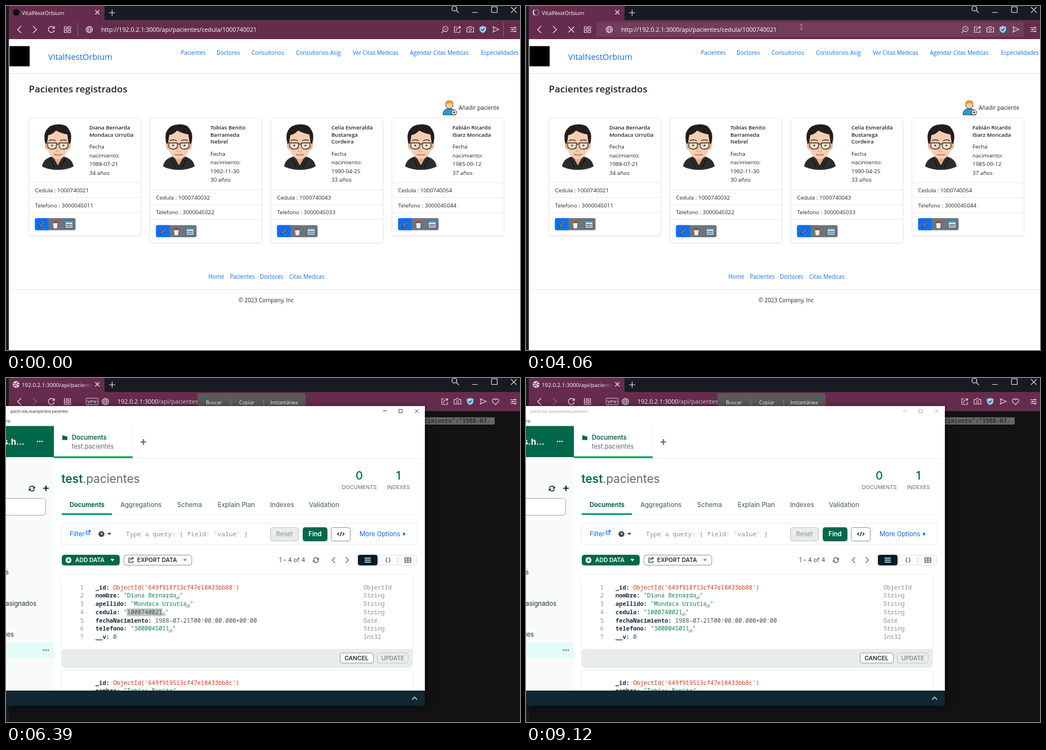
Animation of 913 by 613 pixels, one loop 9.25 s. Source, as an HTML page:

```html
<!DOCTYPE html>
<html lang="es">
<head>
<meta charset="utf-8">
<title>Pacientes</title>
<style>
html, body { margin: 0; width: 100%; height: 100%; overflow: hidden; background: #181c22; }
svg { display: block; width: 100%; height: 100%; }
text { white-space: pre; }
.ui { font-family: "Open Sans", "Noto Sans", sans-serif; }
.db { font-family: Inter, sans-serif; filter: drop-shadow(0 2px 7px rgba(0,0,0,.55)); }
.code { font-family: "Noto Sans Mono", monospace; }
.raw { font-family: "DejaVu Sans Mono", monospace; }
</style>
</head>
<body>
<svg id="stage" class="ui" viewBox="0 0 913 613" preserveAspectRatio="none"></svg>
<script>
const T = (x, y, s, t, f = '#212529', a = '') => `<text x="${x}" y="${y}" font-size="${s}" fill="${f}" ${a}>${t}</text>`;
const R = (x, y, w, h, f, a = '') => `<rect x="${x}" y="${y}" width="${w}" height="${h}" fill="${f}" ${a}/>`;
const P = (d, c = '#eadfe6', w = 1.1, f = 'none') => `<path d="${d}" fill="${f}" stroke="${c}" stroke-width="${w}"/>`;
const F = (d, c) => `<path d="${d}" fill="${c}"/>`;
const C = (x, y, r, f, a = '') => `<circle cx="${x}" cy="${y}" r="${r}" fill="${f}" ${a}/>`;
const G = (id, s, a = '') => `<g id="${id}" ${a}>${s}</g>`;
const move = (x, y, s) => `<g transform="translate(${x} ${y})">${s}</g>`;
const END = 'text-anchor="end"', MID = 'text-anchor="middle"';
const bold = 'font-weight="600"';

const PLUM = '#662c4e', BLUE = '#0d6efd', GREEN = '#00684a', SLATE = '#5c6c75', PALE = '#e8edeb', INK = '#1c2d38';
const HOST = '192.0.2.1:3000', ROUTE = '/api/pacientes';
const patients = [
  { name: ['Diana Bernarda', 'Mondaca Urrutia'], born: '1988-07-21', age: 34, id: '1000740021', tel: '3000045011' },
  { name: ['Tobías Benito', 'Barrameda', 'Nebrel'], born: '1992-11-30', age: 30, id: '1000740032', tel: '3000045022' },
  { name: ['Celia Esmeralda', 'Bustarega', 'Cordeira'], born: '1990-04-25', age: 33, id: '1000740043', tel: '3000045033' },
  { name: ['Fabián Ricardo', 'Ibarz Moncada'], born: '1985-09-12', age: 37, id: '1000740054', tel: '3000045044' }
];
const first = patients[0], docId = '649f918f13cf47e18433bb88';

/* ---- browser frame ---- */
const globe = x => C(x, 42, 5.8, 'none', 'stroke="#eadfe6"') +
  P(`M${x - 5.8} 42h11.6M${x - 5} 39h10M${x - 5} 45h10`, '#eadfe6', .9) +
  `<ellipse cx="${x}" cy="42" rx="2.7" ry="5.8" fill="none" stroke="#eadfe6"/>`;
const tools = P('M801 37h-4.5v10h10v-4M799.5 44.5c0-4 3-6 7.5-6.5M804 36l3.5 1.8-2 3.2') +
  P('M818.5 38.5h3l1-1.8h4l1 1.8h3v8h-12z') + C(824.5, 42.3, 2.2, 'none', 'stroke="#eadfe6"') +
  F('M847 35.5l5.8 2v4.5q-.6 4-5.8 6.3q-5.2-2.3-5.8-6.3v-4.5z', '#8ad3f5') +
  P('M844.3 41.6l2 2.2 3.6-4', PLUM, 1.5) +
  P('M865 37l10.5 4.7-10.5 4.7 1.6-4.7z');
const frame = R(0, 0, 913, 613, '#181c22') + R(5, 0, 170, 26, PLUM) + R(5, 25, 908, 34, PLUM) +
  P('M158.5 7.5l7.5 7.5m0-7.5l-7.5 7.5', '#f3eaf0', 1.2) + P('M183 12h11M188.5 6.5v11', '#e6e6e8', 1.2) +
  C(796.5, 4.5, 4.3, 'none', 'stroke="#e6e6e8" stroke-width="1.3"') + P('M799.6 7.6l4.6 4.6', '#e6e6e8', 1.3) +
  P('M828 11.5h10M862.5 1.5h10v10h-10zM897 2l10 10m0-10l-10 10', '#e6e6e8', 1.1) +
  P('M27 36l-6.5 6 6.5 6', '#f3eaf0', 1.2) +
  P('M103.5 37h4.5v4h-4.5zM110.3 37h4.5v4h-4.5zM103.5 43.3h4.5v4h-4.5zM110.3 43.3h4.5v4h-4.5z') +
  P('M896 38.5h11M896 42h11M896 45.5h11') + F('M903 37h1.5v3h-1.5zM899 40.5h1.5v3h-1.5zM903 44h1.5v3h-1.5z', '#eadfe6');
const status =
  G('loading', P('M75.5 37l10 10m0-10l-10 10', '#f3eaf0', 1.2) +
    C(18, 11.5, 5.2, 'none', 'stroke="#89607a" stroke-width="1.8"') + G('spin', P('M18 6.3A5.2 5.2 0 0 0 13.5 14', '#e8dde4', 1.8))) +
  G('reload', P('M85 38.6A5.4 5.4 0 1 0 85.9 43M86 36v3.6h-3.8', '#f3eaf0', 1.2)) +
  G('homeIcon', C(18, 11.5, 6, '#111')) +
  G('rawIcon', C(18, 11.5, 6, '#f2eaef') + P('M13 9q3 3 5 1t4-3M13.5 14q4-2 6 2M19 12h5', PLUM, 1.6));

/* ---- patients page ---- */
const avatar =
  F('M0 76Q2 62 18 58L38 58Q54 62 56 76Q44 82 28 82Q12 82 0 76Z', '#2c2b2d') +
  F('M19 52h18v9l-9 14-9-14z', '#e3a988') + P('M19 59l9 17 9-17M14 61l8 17M42 61l-8 17', '#111', 1.3) +
  F('M6 33q-3 10 4 14l2-14zM50 33q3 10-4 14l-2-14z', '#e9b393') +
  F('M8 20Q28 4 48 20L46 46Q40 63 28 63Q16 63 10 46Z', '#f6cdb0') +
  F('M6 36Q2 20 7 12Q14 0 30 1Q44 0 49 12Q54 20 50 36L47 34L45 19Q34 17 25 12Q18 19 11 20L9 34Z', '#231d1c') +
  P('M12 30q5-3 12 0M32 30q7-3 12 0', '#3a2a22', 1.5) +
  P('M10 34h15.5v6q-1 5-7.5 5t-8-5zM30.5 34h15.5v6q-1 5-8 5t-7.5-5zM25.5 36h5', '#2b2a30', 1.3, '#ffffff55') +
  C(18, 38.5, 1.8, '#3d5f6e') + C(38, 38.5, 1.8, '#3d5f6e') +
  P('M27 41l-2 8q3 2 6 0', '#d99c7c', 1) + P('M21 54.5q7 2 14 0', '#b5624f', 1.5);

function card(p, i) {
  const d = p.name.length > 2 ? 12.5 : 0, line = y => R(.5, y + d, 199, 1, '#e9eaec');
  const put = (x, y, t) => T(x, y + d, 9.85, t);
  return move(40 + 215 * i, 0,
    R(.5, 199.5, 199, 210 + d, '#fff', 'rx="4" stroke="#e6e7e9" filter="url(#soft)"') + move(24, 210, avatar) +
    p.name.map((n, k) => T(108, 220.3 + 12.4 * k, 9.6, n, '#212529', bold)).join('') +
    ['Fecha', 'nacimiento:', p.born, p.age + ' años'].map((s, k) => put(108, 254 + 15.5 * k, s)).join('') +
    line(314.5) + line(341) + line(367.5) + put(11.5, 332.2, 'Cedula : ' + p.id) + put(11.5, 358.8, 'Telefono : ' + p.tel) +
    move(0, d, R(11.5, 378, 72, 21.5, '#6c757d', 'rx="3"') + F('M14.5 378h21v21.5h-21q-3 0-3-3v-15.5q0-3 3-3z', BLUE) +
      P('M19 394l2.5-2.5 6.5-6.5', '#3b2b20', 3.4) + P('M20 393l2-2 6-6', '#c98643', 2) +
      F('M43.5 387h8l-1 9h-6z', '#f1eeee') + F('M43 384.5q4.5-3.5 9 0v2h-9z', '#a8452f') +
      R(65.5, 383, 13, 12.5, '#d8ecf4', 'stroke="#3a5468" stroke-width=".8"') + R(65.5, 383, 13, 3, '#4b9cc9') +
      P('M67 389.5h10M67 392.5h10', '#557', 1.5)));
}

const nav = [[310.5, 'Pacientes'], [374, 'Doctores'], [436, 'Consultorios'], [515, 'Consultorios Asig'], [616, 'Ver Citas Medicas'], [717.5, 'Agendar Citas Medicas'], [843.5, 'Especialidades']];
const foot = [[359.5, 'Home'], [397.7, 'Pacientes'], [451, 'Doctores'], [503, 'Citas Medicas']];
const links = (list, y) => list.map(([x, t]) => T(x, y, 9.9, t, BLUE)).join('');
const home = T(28, 15.5, 9.75, 'VitalNestOrbium', '#fff') + P('M48 36l6.5 6-6.5 6', '#f3eaf0', 1.2) +
  G('idle', R(127, 29, 1, 26, '#8d6079') + R(883, 29, 1, 26, '#8d6079')) +
  G('barHover', R(125, 28, 759, 27, '#733c5c', 'rx="3"')) +
  G('focus', R(125, 28.5, 760.5, 26, '#5f2948', 'rx="3" stroke="#b8608f" stroke-width="1.3"') + R(446, 35, 1, 13, '#fff')) +
  globe(148) + T(169, 45.5, 10.7, 'http://' + HOST + ROUTE + '/cedula/' + first.id, '#fff') +
  C(780.5, 41, 4.6, 'none', 'stroke="#eadfe6" stroke-width="1.1"') + P('M777.2 44.3l-3.7 3.7M778.5 41h4') + tools +
  R(5, 59, 908, 554, '#fff') + R(6, 71.5, 36, 36, '#000') +
  T(75, 95.5, 14.7, 'VitalNestOrbium', BLUE) + links(nav, 86.7) + R(5, 120, 908, 1, '#dee2e6') +
  T(40.5, 154, 17, 'Pacientes registrados', '#212529', bold) +
  F('M776 194q0-11 11.5-11t11.5 11z', '#2f9ad6') + P('M776 194q0-11 11.5-11t11.5 11z', '#233', .9) +
  C(787.5, 176.5, 6.5, '#f8cfa4', 'stroke="#433" stroke-width=".9"') + F('M780.5 176q-1-8 7-8t7 8q-3-3-6-3t-8 3z', '#e8932f') +
  C(796, 189.5, 4.5, '#fff', 'stroke="#222"') + P('M793.5 189.5h5M796 187v5', '#222') +
  T(804, 184.8, 9.9, 'Añadir paciente') + patients.map(card).join('') +
  links(foot, 485.5) + R(5, 504.5, 908, 1, '#dee2e6') + T(413, 527.6, 9.9, '© 2023 Company, Inc');

/* ---- raw reply page ---- */
const reply = [
  `{"id":"${docId}","nombre":"${first.name[0]}","apellido":"${first.name[1]}","cedula":"${first.id}","fechaNacimiento":"1988-07-`,
  `21","telefono":"${first.tel}","edad":34}`];
const raw = T(28, 15.5, 9.8, HOST + ROUTE.slice(0, -1), '#fff') + R(134, 2, 22, 20, 'url(#fade)') +
  P('M48 36l6.5 6-6.5 6', '#94708a', 1.1) +
  R(142.5, 36, 21, 11.5, 'none', 'rx="1.5" stroke="#d9c9d3"') + T(153, 44.8, 7.6, 'VPN', '#eadfe6', MID + ' letter-spacing=".5" ' + bold) +
  globe(176.5) + T(198, 45.5, 10.68, `${HOST}<tspan fill="#dccbd6">${ROUTE}/cedula/${first.id}</tspan>`, '#fff') +
  move(-22.5, 0, tools) + P('M869.5 47.5l-4.8-4.8q-2-3 .4-5 2.8-1.5 4.4 1.3 1.6-2.8 4.4-1.3 2.4 2 .4 5z') +
  R(5, 59, 908, 554, '#121212') +
  G('selection', R(12, 70, 0, 13, 'inherit', 'id="row1"') + R(12, 83, 0, 13, 'inherit', 'id="row2"')) +
  G('reply', reply.map((s, i) => T(12, 80.3 + 13 * i, 10.29, s, 'inherit')).join(''), 'class="raw"') +
  G('popup', R(340, 27, 192, 31, '#5a5a5a', 'rx="4"') + F('M430 58h12l-6 8z', '#5a5a5a') +
    T(355, 46.6, 8.95, 'Buscar', '#fff') + T(414, 46.6, 8.95, 'Copiar', '#fff') + T(469, 46.6, 8.95, 'Instantánea', '#fff') +
    R(398.5, 37, 1, 14, '#8b8b8b') + R(457.5, 37, 1, 14, '#8b8b8b'));

/* ---- database window ---- */
const dots = (x, y, f) => [-4, 0, 4].map(d => C(x + d, y, 1.3, f)).join('');
const down = (x, y, f) => F(`M${x - 3.5} ${y - 2}h7l-3.5 4.2z`, f);
const cycle = (x, y, c) => P(`M${x - 4.3} ${y - 1}a4.4 4.4 0 0 1 8-1.3M${x + 4.3} ${y + 1}a4.4 4.4 0 0 1-8 1.3`, c, 1.5) +
  F(`M${x + 5.5} ${y - 4.5}v4.5h-4.5zM${x - 5.5} ${y + 4.5}v-4.5h4.5z`, c);
const plus = (x, y, c) => P(`M${x - 5} ${y}h10M${x} ${y - 5}v10`, c, 2.2);
const button = (x, y, w, h, f, c) => R(x + .5, y + .5, w - 1, h - 1, f, `rx="4" stroke="${c}"`);

const STEP = 14.75, rowY = i => 376.6 + STEP * i;
const green = s => `<tspan fill="#12824d">${s}</tspan>`;
const key = s => `<tspan font-weight="700">${s}:</tspan> `;
function quoted(i, name, value) {
  const end = 159 + 6.24 * (name.length + 3 + value.length);
  return T(159, rowY(i), 10.4, key(name) + green('"' + value), INK) + T(end + 5.5, rowY(i), 10.4, '"', '#12824d') +
    P(`M${end - 1} ${rowY(i) + 3}l5.5-6m-2 6l3-3.3`, '#333', .9);
}
const plain = (i, name, value, f) => T(159, rowY(i), 10.4, key(name) + `<tspan fill="${f}">${value}</tspan>`, INK);
const types = ['ObjectId', 'String', 'String', 'String', 'Date', 'String', 'Int32'];
const doc = types.map((s, i) => T(138, rowY(i), 10.4, i + 1, '#889397', END)).join('') +
  G('hover', R(99, 410.5, 623, 14.5, PALE) + R(125, 411.5, 12.5, 12.5, PALE, 'stroke="#3d4f58" rx="1"') + P('M128.5 417.7h5.5M131.2 415v5.5', INK, 1) +
    F('M111 414h8v1.5h-8zM113.5 413h3v1h-3zM111.5 416h7l-.7 6.5h-5.6z', INK)) +
  plain(0, '_id', `ObjectId('${docId}')`, '#d83713') + quoted(1, 'nombre', first.name[0]) + quoted(2, 'apellido', first.name[1]) +
  quoted(3, 'cedula', first.id) + plain(4, 'fechaNacimiento', first.born + 'T00:00:00.000+00:00', '#3d4f58') +
  quoted(5, 'telefono', first.tel) + plain(6, '__v', '0', '#3d4f58') +
  G('picked', R(214.5, 410.5, 63.5, 14, 'inherit') + T(215.2, rowY(3), 10.4, first.id, 'currentColor')) +
  types.map((s, i) => T(635, rowY(i), 10.4, s, '#889397')).join('') +
  plain(11.53, '_id', "ObjectId('649f919513cf47e18433bb8c')", '#d83713') +
  T(159, 561.3, 10.4, key('nombre') + green(`"${patients[1].name[0]}"`), INK);

const tabs = [[203, 'Aggregations'], [304, 'Schema'], [376, 'Explain Plan'], [469, 'Indexes'], [538, 'Validation']];
const side = [[5, 349.5, 's'], [54, 405.5, 'asignados'], [14, 460.5, 'des']];
const db = R(0, 50, 744, 534, '#fff') +
  G('title', T(110, 61.5, 6.4, 'qzkrtn.bds.example/test.pacientes', 'currentColor', END + ' class="ui"') +
    P('M670 58.5h6M698 56h6v6h-6zM726.5 56l6 6m0-6l-6 6', 'currentColor', .9)) +
  T(8, 79, 6.4, 'Help', '#333', END + ' class="ui"') +
  R(0, 85.5, 85, 472, '#f9fbfa') + R(0, 85.5, 85, 55.5, GREEN) + T(33, 118.5, 15, 's.h...', '#fff', END + ' font-weight="700"') + dots(60, 113, '#fff') +
  cycle(46, 197, INK) + plus(71, 196.5, INK) + R(-10, 214.5, 80.5, 30, '#fff', 'rx="5" stroke="#a3abae"') +
  R(0, 471, 85, 28, '#e3fcf7') + dots(71, 485, SLATE) + side.map(([x, y, s]) => T(x, y, 11.3, s, INK, END)).join('') +
  R(85, 143, 659, 1, PALE) + R(224.5, 85.5, 1, 58, PALE) + R(85, 139.5, 140, 3.3, '#00a35c') +
  F('M100 102.5h4l1 1.5h4v6.5h-9z', GREEN) + T(117, 110, 11.2, 'Documents', GREEN, bold) + T(117, 126, 11.2, 'test.pacientes', SLATE) + plus(244, 114, SLATE) +
  T(98.5, 187, 20.7, `<tspan font-weight="600" fill="${GREEN}">test</tspan>.pacientes`, SLATE) +
  T(627.5, 180.5, 20, '0', GREEN, MID + ' font-weight="500"') + T(697, 180.5, 20, '1', GREEN, MID + ' font-weight="500"') +
  T(627.5, 197.5, 9.5, 'DOCUMENTS', SLATE, MID) + T(697, 197.5, 9.5, 'INDEXES', SLATE, MID) +
  T(113, 229.5, 11.1, 'Documents', GREEN, 'font-weight="700"') + tabs.map(([x, s]) => T(x, 229.5, 11.45, s, SLATE, 'font-weight="500"')).join('') +
  R(99, 243, 631, 1, PALE) + R(99, 241, 89, 3, '#00a35c') +
  R(98.5, 258.5, 632, 39, '#fff', `rx="5" stroke="${PALE}"`) + T(113, 282.3, 11.3, 'Filter', '#016bf8') +
  P('M145 272.5h-2.5v6h6v-2.5M146 271.5h3.5v3.5M149 272l-4 4', '#016bf8', 1.2) +
  C(169.5, 278, 5.3, '#3d4f58') + P('M169.5 275v3.3h2.5', '#fff', 1.2) + down(183.5, 278, '#3d4f58') +
  T(213, 282, 11.3, "Type a query: { field: 'value' }", '#889397', 'class="code"') +
  button(469, 266, 51, 25, PALE, '#c1c7c6') + T(494.5, 282.3, 11.3, 'Reset', '#889397', MID) +
  button(527, 266, 44, 25, GREEN, GREEN) + T(549, 282.3, 11.2, 'Find', '#fff', MID + ' ' + bold) +
  button(577, 266, 35, 25, '#fff', '#889397') + P('M591.5 275.5l-2.5 2.5 2.5 2.5M598 275.5l2.5 2.5-2.5 2.5M595.8 274l-2 8', INK, 1.5) +
  T(628, 282.3, 11.3, 'More Options', '#016bf8') + F('M705.5 274.5l4.5 3.5-4.5 3.5z', '#016bf8') +
  button(99, 315, 103, 19, GREEN, GREEN) + C(111, 324.5, 5.2, '#fff') + P('M108.3 324.5h5.4M111 321.8v5.4', GREEN, 1.4) +
  T(123, 328.2, 10.3, 'ADD DATA', '#fff', bold) + down(189, 324.5, '#fff') +
  button(209, 315, 121.5, 19, '#fff', '#889397') + P('M221 321h-3v7.5h7.5v-3M221 325.5q0-4 4-4.5M223.5 319l3 2-2.5 2.5', '#3d4f58', 1.3) +
  T(233, 328.2, 10.2, 'EXPORT DATA', INK, bold) + down(318, 324.5, '#889397') +
  T(485, 328.2, 10.8, '1 – 4 of 4', '#3d4f58') + cycle(550.5, 324.5, SLATE) +
  P('M584.5 319.5l-5 5 5 5M603.5 319.5l5 5-5 5', '#889397', 1.8) +
  button(625, 315, 105, 19, '#f9fbfa', '#dfe4e2') + R(625, 315, 35, 19, '#001e2b', 'rx="4"') + P('M637 321h11M637 324.5h11M637 328h11', '#fff', 1.6) +
  T(678, 328.2, 11, '{ }', SLATE, MID + ' letter-spacing="-1" ' + bold) + R(695.5, 320, 1, 9, '#c1c7c6') + P('M708.5 320.5h10.5v8h-10.5zM708.5 324.5h10.5M713.7 320.5v8', SLATE, 1.5) +
  R(98.5, 350.5, 624, 166, '#fff', `rx="7" stroke="${PALE}"`) + R(98.5, 520.5, 624, 60, '#fff', `rx="7" stroke="${PALE}"`) +
  F('M98.5 483h624v26q0 7.5-7 7.5h-610q-7 0-7-7.5z', PALE) + `<g class="code">${doc}</g>` +
  button(593, 489.5, 60, 19, '#fff', '#889397') + T(622.5, 502.8, 10.4, 'CANCEL', INK, MID + ' ' + bold) +
  button(659, 489.5, 56, 19, PALE, '#c1c7c6') + T(687, 502.8, 10.2, 'UPDATE', '#889397', MID + ' ' + bold) +
  G('scroll', R(737, 351, 7, 71, '#d5d9d8', 'rx="3"')) +
  R(0, 557, 744, 27, '#112733') + P('M721.5 573l4.3-4.3 4.3 4.3', '#c1c7c6', 1.8);

const pointer = G('arrow', P('M0 0v9.5l2.2-2 1.5 3.3 1.5-.7-1.5-3.2h3z', '#333', .8, '#fff')) +
  G('beam', P('M-2.5-4.5h2l.5.5.5-.5h2M-2.5 4.5h2l.5-.5.5.5h2M0-4v8', '#b9b3b8', .9));

const stage = document.getElementById('stage');
stage.innerHTML = `<defs><linearGradient id="fade"><stop stop-color="${PLUM}" stop-opacity="0"/><stop offset=".85" stop-color="${PLUM}"/></linearGradient>
  <filter id="soft"><feDropShadow dx="0" dy="1" stdDeviation="1" flood-opacity=".06"/></filter></defs>` +
  frame + G('home', home) + G('raw', raw) + status + G('db', db, 'class="db"') + G('pointer', pointer);

/* ---- motion ---- */
const el = id => document.getElementById(id);
const show = (id, on) => el(id).style.display = on ? '' : 'none';

const TICK = 66.6;
// pointer visits as [time, x, y]; it is hidden between them
const visits = [
  [[460, 9, 601], [1190, 550, 30], [1280, 550, 30], [1400, 555, 33], [1880, 555, 33], [2480, 152, 336], [2790, 143, 344],
    [2860, 66, 406], [3660, 489, 37], [4475, 489, 37], [4930, 5, 77], [5390, 75, 153], [5590, 45, 358]],
  [[6660, 130, 495], [7060, 222, 419], [7460, 287, 420.5], [7660, 400, 559]],
  [[8060, 861, 610], [8190, 878, 604], [8320, 898, 610]]
];

// visits start fast, end fast, and pause softly at the points between
function pointerAt(t) {
  const v = visits.find(v => t >= v[0][0] && t < v.at(-1)[0] + TICK / 2);
  if (!v) return null;
  const i = Math.min(v.findLastIndex(p => p[0] <= t), v.length - 2);
  const [t0, x0, y0] = v[i], [t1, x1, y1] = v[i + 1];
  const u = Math.min(1, (t - t0) / (t1 - t0));
  const k = i === 0 ? u * (2 - u) : i === v.length - 2 ? u * u : u * u * (3 - 2 * u);
  return [x0 + (x1 - x0) * k, y0 + (y1 - y0) * k];
}

function draw(now) {
  const t = Math.floor((now % 9250 + 9) / TICK) * TICK + 10;
  const onHome = t < 4130, onDb = t >= 6390;
  const loading = t >= 3990 && t < 4190, focused = t >= 1330 && t < 3990;
  const at = pointerAt(t), [x, y] = at || [0, 0];
  const overBar = at && !onDb && x > 125 && x < 885 && y > 28 && y < 56;

  show('home', onHome); show('raw', !onHome); show('db', onDb);
  show('idle', !focused && !overBar); show('barHover', !focused && overBar); show('focus', focused);
  el('focus').style.opacity = t < 1400 ? .6 : 1;
  show('loading', loading); show('reload', !loading);
  show('homeIcon', onHome && !loading); show('rawIcon', !onHome && !loading);
  el('spin').setAttribute('transform', `rotate(${(t - 4130) * .6} 18 11.5)`);

  const dragging = t >= 4930 && t < 5460;
  const typing = dragging || overBar || (!onHome && !onDb && y > 68 && y < 97);
  show('pointer', at);
  el('pointer').setAttribute('transform', `translate(${x} ${y})`);
  show('beam', typing); show('arrow', !typing);

  const all = t >= 5390 || (dragging && y > 96);
  const drag = Math.max(0, x - 12);
  const w1 = all || (dragging && y > 83) ? 856 : dragging ? drag : 0;
  const w2 = all ? 236 : dragging && y > 83 ? Math.min(drag, 236) : 0;
  el('row1').setAttribute('width', w1);
  el('row2').setAttribute('width', w2);
  el('selection').setAttribute('fill', onDb ? '#646464' : '#0560d0');
  el('reply').setAttribute('fill', onDb ? '#161616' : '#fff');
  show('popup', t >= 5460);

  const row = Math.round((y - 373) / STEP), inDb = at && onDb && y < 557;
  show('hover', inDb && row >= 0 && row < 7);
  el('hover').setAttribute('transform', `translate(0 ${(row - 3) * STEP})`);
  show('scroll', inDb);
  // the picked value turns blue once its window has the focus, until a click clears it
  const active = t >= 6470;
  show('picked', t < 7200);
  el('picked').setAttribute('fill', active ? '#0078d7' : '#c3c6c6');
  el('picked').setAttribute('color', active ? '#fff' : '#2d5a45');
  el('title').setAttribute('color', t >= 9120 ? '#a0a0a0' : '#222');
}

function loop() {
  draw(performance.now());
  requestAnimationFrame(loop);
}
loop();
</script>
</body>
</html>
```
